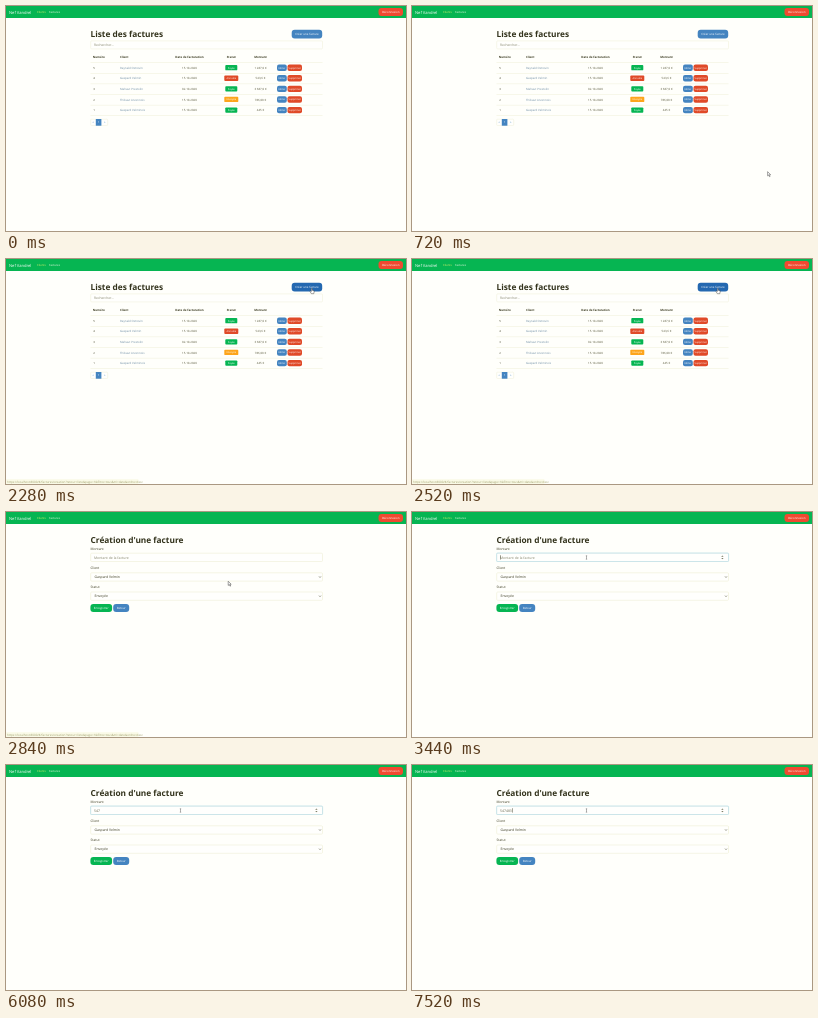
Recreate the animation shown at these times as an HTML page. Size 400x225 px, loop 8 s.

```html
<!DOCTYPE html>
<html lang="fr">
<head>
<meta charset="utf-8">
<title>Factures</title>
<style>
html, body { margin: 0; height: 100%; overflow: hidden; background: #fffffb; }
svg { display: block; width: 100vw; height: 100vh; }
text { font-family: "Open Sans", "Noto Sans", sans-serif; text-rendering: geometricPrecision; white-space: pre; }
</style>
</head>
<body>
<svg id="stage" viewBox="0 0 400 225"></svg>
<script>
const GREEN = '#06b552', BLUE = '#4484c0', BLUE_HOVER = '#2468b0', RED = '#e04a28', ORANGE = '#fda51c';
const INK = '#3c3c22', MUTED = '#85856c', LINE = '#eaeacc';
const LOOP = 8000;

const rect = (x, y, w, h, fill, r = 0, more = '') =>
  `<rect x="${x}" y="${y}" width="${w}" height="${h}" rx="${r}" fill="${fill}" ${more}/>`;
const text = (s, x, y, size = 3.46, fill = INK, more = '') =>
  `<text x="${x}" y="${y}" font-size="${size}" fill="${fill}" ${more}>${s}</text>`;
const mid = 'text-anchor="middle"', bold = 'font-weight="700"';
const button = (s, x, y, w, h, fill, size = 2.7, r = 3, more = '') =>
  rect(x, y, w, h, fill, r, more) +
  text(s, x + w / 2, y + h / 2 + size * .35, size, '#fff', mid);
const field = (y, more = '') =>
  rect(84.7, y, 231.8, 8.3, '#fffffd', 1, `stroke="${LINE}" stroke-width=".5" ${more}`);
const title = s => text(s, 84.5, 31, 8.3, '#33331c', bold);

function header() {
  return rect(0, 0, 400, 12, GREEN) +
    text('Nef Vandrel', 3, 7.5, 4.1, '#fff') +
    text('Clients', 31, 7.1, 2.8, '#d8f06a') +
    text('Factures', 43, 7.1, 2.8, '#eefbe4') +
    button('Déconnexion', 372.5, 2, 24.5, 8, '#f04a30', 2.9);
}

function listPage() {
  const tags = { 'Payée': GREEN, 'Annulée': RED, 'Envoyée': ORANGE };
  const rows = [
    [5, 'Raynald Ostrevin', '15.10.2020', 'Payée', '1 287,0 €'],
    [4, 'Gaspard Velmin', '15.10.2020', 'Annulée', '543,6 €'],
    [3, 'Mahaut Prestolin', '02.10.2020', 'Payée', '3 687,0 €'],
    [2, 'Thibaut Arvennois', '15.10.2020', 'Envoyée', '786,00 €'],
    [1, 'Gaspard Velminois', '15.10.2020', 'Payée', '445 €']
  ];
  const heads = [['Numéro', 92.8], ['Client', 118.2], ['Date de facturation', 183.5], ['Statut', 225.3], ['Montant', 254.5]];
  const body = rows.map(([id, name, date, state, sum], i) => {
    const y = 61.7 + i * 10.6, w = state === 'Payée' ? 12 : 14;
    return rect(84.5, y - 5.2, 232, .4, LINE) +
      text(id, 87.2, y + 1, 2.8) +
      text(name, 114, y + 1, 2.9, '#6f8ea6') +
      text(date, 183.5, y + 1, 2.9, '#57573a', mid) +
      button(state, 225.3 - w / 2, y - 2.7, w, 5.3, tags[state], 2.5, .9) +
      text(sum, 254.5, y + 1, 2.9, '#57573a', mid) +
      button('Editer', 271, y - 3.2, 9.8, 6.4, BLUE, 2.5, 2) +
      button('Supprimer', 281.5, y - 3.2, 14.5, 6.4, RED, 2.5, 2);
  }).join('');
  return title('Liste des factures') +
    button('Créer une facture', 285.7, 23.8, 30.5, 8.6, BLUE, 2.9, 3, 'id="create"') +
    rect(84.7, 34.9, 231.8, 8, '#fffffd', 1, `stroke="${LINE}" stroke-width=".4"`) +
    text('Rechercher...', 88, 40.1, 3.3, MUTED) +
    heads.map(([s, x]) => text(s, x, 52.4, 2.92, INK, mid + ' ' + bold)).join('') +
    body + rect(84.5, 109.5, 232, .4, LINE) +
    rect(84.7, 113.2, 17, 6.3, '#fffffd', .8, `stroke="${LINE}" stroke-width=".4"`) +
    rect(89.8, 113, 5.6, 6.7, BLUE) +
    text('«', 87.3, 117.4, 2.8, BLUE, mid) +
    text('1', 92.6, 117.4, 2.8, '#fff', mid) +
    text('»', 98.6, 117.4, 2.8, BLUE, mid);
}

function formPage() {
  const select = (label, value, y) =>
    text(label, 84.5, y - 4, 3.3) + field(y) + text(value, 88.5, y + 5.4) +
    `<path d="M313 ${y + 3.6}l1 1.1 1-1.1" fill="none" stroke="${INK}" stroke-width=".5"/>`;
  return title("Création d'une facture") +
    text('Montant', 84.5, 38, 3.3) +
    rect(84, 40.5, 233.2, 9.6, '#e2f2f4', 1.5, 'id="glow"') +
    field(41.2, 'id="amount"') +
    text('Montant de la facture', 88, 46.6, 3.46, MUTED, 'id="hint"') +
    text('', 88, 46.6, 3.46, '#66664e', 'id="typed"') +
    rect(88, 43.2, .45, 4.4, INK, 0, 'id="caret"') +
    `<path id="spin" d="M309.2 44.8l1.2-1.3 1.2 1.3zM309.2 46l1.2 1.3 1.2-1.3z" fill="#77775f"/>` +
    select('Client', 'Gaspard Velmin', 60.8) +
    select('Statut', 'Envoyée', 80) +
    button('Enregistrer', 84.4, 92, 21.7, 8, GREEN, 2.9) +
    button('Retour', 107.2, 92, 16, 8, BLUE, 2.9);
}

const $ = id => document.getElementById(id);
const group = (id, html) => `<g id="${id}">${html}</g>`;
$('stage').innerHTML = header() + group('list', listPage()) + group('form', formPage()) +
  group('status', rect(0, 220.3, 132.5, 4.7, '#fafae6', .5) +
    text('https://localhost:8000/#/factures/creation?retour=liste&amp;page=1&amp;filtre=tous&amp;tri=date&amp;ordre=desc', 1, 223.8, 3, '#a0a070')) +
  group('pointer',
    `<path id="arrow" d="M0 0v4.2l1-.9.8 1.7.7-.3-.8-1.7h1.3z" fill="#fff" stroke="#333" stroke-width=".45"/>
     <path id="hand" d="M.3.3v3l-.8-.5-.5.6 1.4 2h2.4l.5-2.8-2-.6v-1.7q-.5-.6-1 0z" fill="#fff" stroke="#333" stroke-width=".45"/>
     <path id="beam" d="M-.7-1.7h1.4M0-1.7v3.4M-.7 1.7h1.4" fill="none" stroke="#555" stroke-width=".45"/>`);

// Pointer stops: time, x, y
const path = [[40, 401, 130], [880, 345, 174], [1600, 228, 162], [1720, 228, 162], [2000, 334, 80], [2240, 305, 29.3],
  [2560, 305, 29.3], [2840, 222.3, 69.3], [3280, 174.5, 45.5], [LOOP, 174.5, 45.5]];
// Amount field: time, typed text, caret shown
const FOCUS = 3320;
const keys = [[FOCUS, '', 1], [3840, '', 0], [4360, '', 1], [4880, '5', 1], [5440, '54', 1], [5560, '547', 1],
  [6080, '547', 0], [6520, '547', 1], [7080, '547', 0], [7360, '5474', 1], [7520, '547483', 1]];

function pointerAt(t) {
  const i = Math.max(1, path.findIndex(p => t < p[0]));
  const [t0, x0, y0] = path[i - 1], [t1, x1, y1] = path[i];
  const k = Math.max(0, (t - t0) / (t1 - t0));
  return [x0 + (x1 - x0) * k, y0 + (y1 - y0) * k];
}

const show = (id, on) => $(id).setAttribute('display', on ? 'inline' : 'none');

function draw(now) {
  const t = now % LOOP, onForm = t >= 2560, focused = t >= FOCUS;
  const [x, y] = pointerAt(t);
  const hover = !onForm && x > 285.7 && x < 316.2 && y < 32.4;
  const overField = onForm && x < 317 && y > 41 && y < 49.5;
  const [, value, caret] = keys.findLast(k => t >= k[0]) || [0, '', 0];

  show('list', !onForm);
  show('form', onForm);
  show('status', hover || (onForm && t < 3080));
  $('create').setAttribute('fill', hover ? BLUE_HOVER : BLUE);

  show('glow', focused);
  show('spin', focused || overField);
  $('amount').setAttribute('stroke', focused ? '#a6d0d8' : LINE);
  show('hint', !value);
  $('typed').textContent = value;
  show('caret', caret);
  $('caret').setAttribute('x', 88 + (value ? $('typed').getComputedTextLength() + .2 : 0));

  show('pointer', t >= path[0][0]);
  $('pointer').setAttribute('transform', `translate(${x} ${y})`);
  show('hand', hover);
  show('beam', overField);
  show('arrow', !hover && !overField);
}

const start = performance.now();
function tick() {
  draw(performance.now() - start);
  requestAnimationFrame(tick);
}
tick();
</script>
</body>
</html>
```
